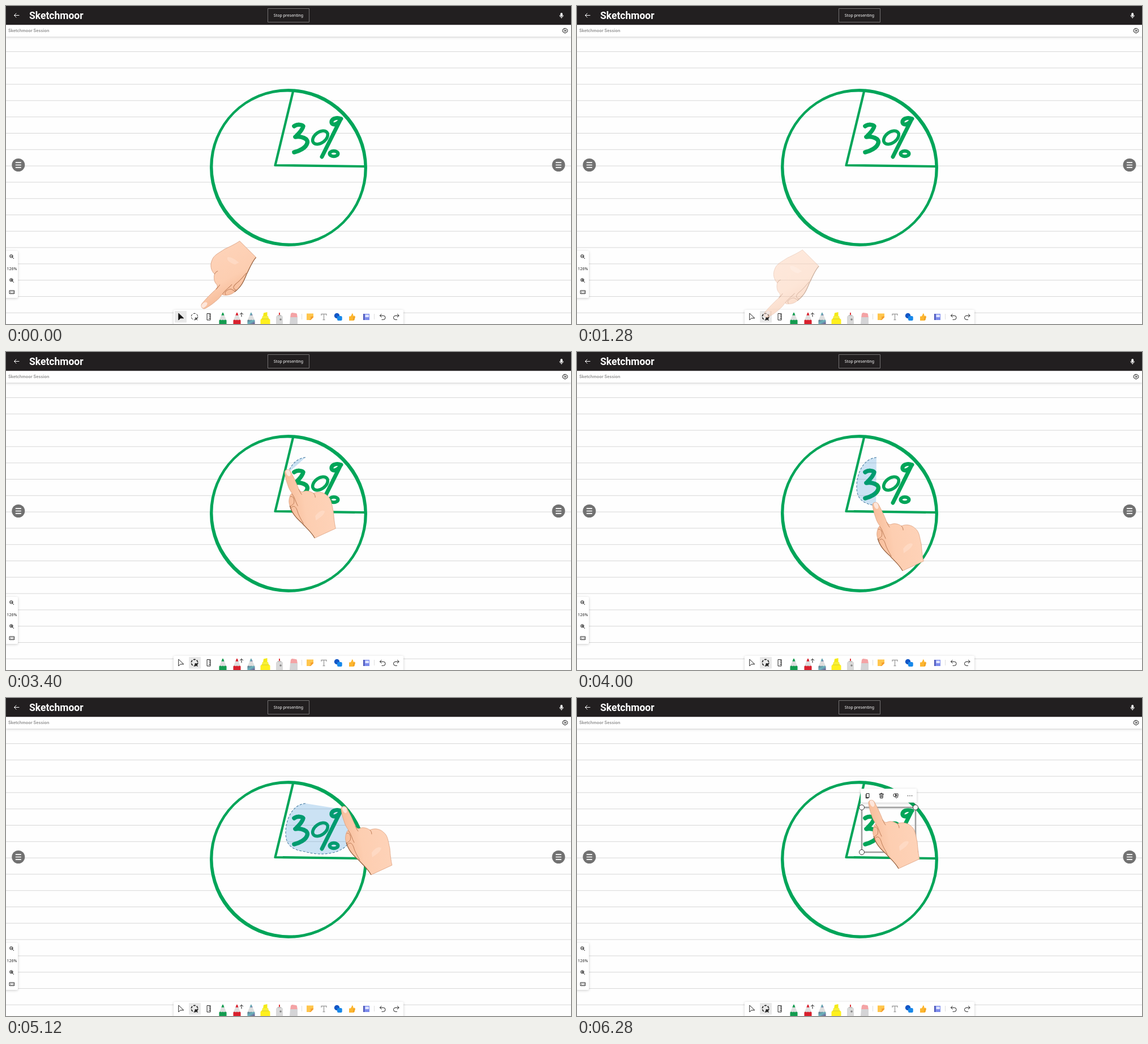
Animation, 998 px wide and 561 px high, one loop 6.96 s. Source, as an HTML page:

```html
<!DOCTYPE html>
<html lang="en">
<head>
<meta charset="utf-8">
<title>Lasso select</title>
<style>
  html, body { margin: 0; height: 100%; overflow: hidden; background: #fefefe; }
  svg { display: block; width: 998px; height: 561px; }
  .panel { fill: #fff; filter: drop-shadow(0 1px 2px #0003); }
  .icon { fill: none; stroke: #222; stroke-width: 1; stroke-linecap: round; stroke-linejoin: round; }
  .ink { fill: none; stroke: #00a559; stroke-linecap: round; stroke-linejoin: round; }
  .crease { fill: none; stroke: #b87550; stroke-width: .9; stroke-linecap: round; }
  text { font-family: "Noto Sans", sans-serif; font-size: 7px; }
</style>
</head>
<body>
<svg viewBox="0 0 998 561">
  <defs>
    <linearGradient id="skin" x1="0" y1=".6" x2="1" y2=".4">
      <stop offset="0" stop-color="#f5b995"/>
      <stop offset=".4" stop-color="#fdceb1"/>
      <stop offset="1" stop-color="#fed3b9"/>
    </linearGradient>
    <linearGradient id="galaxy" x2="1" y2="1">
      <stop offset="0" stop-color="#5e6f86"/>
      <stop offset=".5" stop-color="#69b5bd"/>
      <stop offset="1" stop-color="#6d4f8c"/>
    </linearGradient>
    <g id="menuButton">
      <circle r="11.5" fill="#717171"/>
      <path d="M-5-4.3H5M-5 0H5M-5 4.3H5" stroke="#fff" stroke-width="1.7"/>
    </g>
    <g id="lens" class="icon">
      <circle cx="-.7" cy="-.7" r="2.7"/><path d="M1.3 1.3 3.6 3.6M-2-.7H.6"/>
    </g>
    <g id="pen">
      <path d="M-6.5 13V6L-2.2-3H2.2L6.5 6V13Z" fill="#dedede"/>
      <path d="M-6.5 13V6.5Q-4 4.5-2 6.5 0 4.5 2 6.5 4 4.5 6.5 6.5V13Z"/>
      <path d="M-2.6-2.2-.9-6.6Q0-8 .9-6.6L2.6-2.2Z"/>
    </g>
  </defs>

  <path id="rules" stroke="#d7d7d7"/>

  <!-- drawing -->
  <path fill="#00a559" fill-rule="evenodd"
    d="M360 285a139 139 0 1 1 278 0a139 139 0 1 1-278 0ZM405.3 378.7A132.5 134.6-45 1 1 592.7 191.3A132.5 134.6-45 1 1 405.3 378.7Z"/>
  <g class="ink">
    <path d="M507 151 475.500 281 633 283" stroke-width="4.200"/>
    <path d="M509 212C514 208 523 209 525 212C524 219 516 226 511 231C521 229 535 234 532 242C530 250 518 256 509 258" stroke-width="7.500"/>
    <ellipse cx="555" cy="232" rx="15" ry="9.500" transform="rotate(-36 555 232)" stroke-width="5.500"/>
    <path d="M592 199C582 195 574 200 575 206C577 212 587 208 591 200L558 266" stroke-width="7"/>
    <ellipse cx="579" cy="260.500" rx="7.500" ry="4.700" stroke-width="6"/>
  </g>

  <!-- header -->
  <path class="panel" d="M0 30H998V54H0Z"/>
  <path fill="#221f20" d="M0 0H998V33.300H0Z"/>
  <path class="icon" style="stroke:#fff" d="M23 16.500H14.500M18 13 14.500 16.500 18 20"/>
  <text x="41" y="23" fill="#fff" style="font:700 17.500px Roboto,sans-serif">Sketchmoor</text>
  <path d="M462.500 4.500H535.500V28.500H462.500Z" fill="none" stroke="#757373"/>
  <text x="499" y="19" text-anchor="middle" fill="#fff" font-weight="500">Stop presenting</text>
  <rect x="979.300" y="12" width="3.800" height="6.500" rx="1.900" fill="#fff"/>
  <path class="icon" style="stroke:#fff" d="M978 16.500a3.200 3.200 0 0 0 6.400 0M981.200 20V21.500"/>
  <text x="4" y="46.300" fill="#8c8c8c" style="font:600 7.300px Inter,sans-serif">Sketchmoor Session</text>
  <g class="icon" transform="translate(987.500 43.500)">
    <path d="M-1.500-4H1.500L2-2.900 3.600-2.500 4.500 0 3.600 2.500 2 2.900 1.500 4H-1.500L-2 2.900-3.600 2.500-4.500 0-3.600-2.500-2-2.900Z"/>
    <circle r="1.500"/>
  </g>

  <!-- side controls -->
  <use href="#menuButton" x="21.800" y="280.500"/>
  <use href="#menuButton" x="976" y="280.500"/>
  <rect class="panel" x="-3" y="432" width="24" height="83" rx="2"/>
  <use href="#lens" x="10" y="442"/>
  <text x="1.500" y="466" fill="#222">126%</text>
  <use href="#lens" x="10" y="484"/>
  <path class="icon" d="M9.600 482V484.600M6.500 502H14.500V507.500H6.500ZM9 504 8 504.800 9 505.600M12 504 13 504.800 12 505.600"/>

  <!-- toolbar -->
  <rect class="panel" x="296" y="536" width="406" height="28" rx="2"/>
  <rect id="activeTool" y="538" width="21" height="20.500" rx="1" fill="#e9e9e9"/>
  <path id="pointer" class="icon" d="M304.800 542.500V554L308 550.800H313.500Z"/>
  <g id="lasso" class="icon">
    <circle cx="333" cy="548" r="5.700" stroke-dasharray="4 2" stroke-linecap="butt"/>
    <path d="M334.500 550.500 338 554"/><circle cx="335.500" cy="551.300" r="1.500"/>
  </g>
  <path class="icon" stroke-width="1.300" d="M355.500 542.500H361V554H355.500ZM358.500 545H361M359 548.200H361M358.500 551.300H361"/>
  <use href="#pen" x="383" y="548" fill="#129c4f"/>
  <use href="#pen" x="408" y="548" fill="#d9202d"/>
  <path class="icon" d="M416 548V541.500M413.300 544 416 541.300 418.700 544"/>
  <use href="#pen" x="433" y="548" fill="url(#galaxy)"/>
  <g transform="translate(458 548)">
    <path d="M-4 0-3-6.500 3.500-8V0Z" fill="#f4ea18"/>
    <path d="M-5-1H5L6.500 5H-6.500Z" fill="#f7f03a"/>
    <path d="M-8.500 13V6Q-8 3.500-5 3.500H5Q8.500 3.500 8.500 6V13Z" fill="#fff01d"/>
    <path d="M-6.500 4H6.500" stroke="#d6cf2a"/>
  </g>
  <g transform="translate(483 548)">
    <path d="M0-7V0" stroke="#e0383c" stroke-width="2"/>
    <path d="M-6 13V0L-3-3H3L6 0V13Z" fill="#d9d9d9"/>
    <circle cx="2" cy="5" r="1.800" fill="#888"/><path d="M-3-2H3" stroke="#aaa"/>
  </g>
  <g transform="translate(508 548)">
    <path d="M-6 2-5-5Q-4-7-2-7L4-6Q6-6 6-4L7 2Z" fill="#f4a3a5"/>
    <path d="M-7 13-6 1H7V13Z" fill="#d4d4d6"/>
  </g>
  <path d="M522.500 543V553M650.500 543V553" stroke="#ddd"/>
  <path d="M531 542.500H543V549L538 554H531Z" fill="#ffc64d"/>
  <path d="M543 547.500V549L538 554H534.500Q540 553 538 548Z" fill="#f59c2c"/>
  <path d="M557 546V543.500H566V546M561.500 543.500V553.500M559.500 553.500H563.500" fill="none" stroke="#a3a3a3" stroke-width="1.400"/>
  <circle cx="584.500" cy="546.500" r="4.700" fill="#1457c6"/>
  <rect x="585" y="547" width="8.700" height="8" rx="2" fill="#1688ea"/>
  <path d="M606 547.500H608.500Q611 545 611 542.500Q613.500 541.800 613.300 546.500H615.500Q617.500 547 616.800 549L615.500 553.500Q615 555 612.500 555H606Z" fill="#fdb62f"/>
  <path d="M613 549.300H616.500M613 551.500H616M613 553.500H615.500" stroke="#d98312" stroke-width=".7"/>
  <path d="M631 543H642V554H631Z" fill="#7d8cec"/>
  <path d="M634.500 544.500H641V549H634.500Z" fill="#dfe4ff"/>
  <path d="M631 543H633.300V554H631Z" fill="#4a55b8"/>
  <path class="icon" stroke-width="1.200" d="M663 543.500 660.500 546.300 663.300 549M660.500 546.300H666.500A3.500 3.500 0 0 1 666.500 553.300H664M691.500 543.500 694 546.300 691.200 549M694 546.300H688A3.500 3.500 0 0 0 688 553.300H690.500"/>

  <!-- lasso trail and selection -->
  <path id="area" fill="#0072cc" fill-opacity=".2"/>
  <path id="trail" fill="none" stroke="#4f82a6" stroke-width="1.100" stroke-dasharray="4 2.600"/>
  <g id="selection">
    <path d="M503 193H598V272H503Z" fill="none" stroke="#c8c8c8" stroke-width="3"/>
    <path d="M503 193H598V272H503Z" fill="none" stroke="#777"/>
    <g fill="#fff" stroke="#333">
      <circle cx="503" cy="193" r="4.500"/><circle cx="598" cy="193" r="4.500"/>
      <circle cx="503" cy="272" r="4.500"/><circle cx="598" cy="272" r="4.500"/>
    </g>
    <rect class="panel" x="501" y="160" width="99" height="24.500" rx="1.500"/>
    <g class="icon">
      <path d="M511.500 168.500H516V175.500H511.500ZM510.300 170V176.700H514.500"/>
      <path d="M534 169.500H541.500M536.500 169.300V168H539V169.300M535 169.500 535.500 176.500H540L540.500 169.500M537 171.500V174.500M538.700 171.500V174.500"/>
      <circle cx="561.500" cy="171.500" r="2.700"/>
      <path d="M563 169H567V173H563ZM561.500 174.200 564 176.500 567 174.500"/>
      <path stroke-width="1.500" d="M584.500 172.500h0M588 172.500h0M591.500 172.500h0"/>
    </g>
  </g>

  <!-- hand, with the fingertip at the local zero point -->
  <g id="hand">
    <path fill="url(#skin)" stroke="#d89a78" stroke-width=".7"
      d="M-5 4C-6-2 2-4 5 1C10 10 16 22 20 33C22 37 25 38 28 37C34 34 42 37 46 40C54 36 64 38 70 44C78 50 78 60 81 72C82 84 83 94 85 102L48 119C42 108 33 101 26 93C16 84 8 76 5 64C2 58 2 52 4 46C5 43 6 41 8 40C5 36 2 31 0 24C-3 16-4 10-5 4Z"/>
    <path fill="#fde6db" d="M-3 2C-4-2 2-3 4 1C6 5 6 9 3 10C0 10-2 6-3 2Z"/>
    <path fill="#ffe0cd" opacity=".6" d="M49 80C55 72 62 68 66 72C64 80 55 84 50 88Z"/>
    <path class="crease" d="M8 41C13 47 14 55 18 62M5 46C10 43 13 52 11 58C9 61 6 61 5 64M6 66C10 61 14 62 17 70C19 78 24 86 28 93M20 33C22 37 23 40 25 42M46 40C48 42 49 44 49 47"/>
    <path fill="none" stroke="#95613f" stroke-width="1.200" d="M4 62C8 76 16 84 26 93C33 101 42 108 48 119"/>
  </g>
</svg>
<script>
const LOOP = 6960;
const $ = id => document.getElementById(id);
const show = (id, on) => $(id).style.display = on ? '' : 'none';
const ramp = (t, from, to) => Math.min(1, Math.max(0, (t - from) / (to - from)));
const ease = u => u * u * (3 - 2 * u);
const mix = (a, b, u) => a.map((v, i) => v + (b[i] - v) * u);

// Lasso stroke: each leg has an end time, two control points and an end point.
const START = [529, 186], START_TIME = 3040;
const legs = [
  [3600, [505, 188], [494, 215], [494, 238]],
  [4000, [494, 262], [508, 268], [528, 271]],
  [4600, [550, 278], [590, 278], [605, 256]],
  [5120, [606, 240], [606, 214], [598, 197]],
  [5640, [584, 186], [562, 182], [544, 182]],
  [5800, [538, 182], [533, 184], [528, 185]]
];

function bezier(a, b, c, d, u) {
  const bc = mix(b, c, u);
  return mix(mix(mix(a, b, u), bc, u), mix(bc, mix(c, d, u), u), u);
}

function strokeUntil(t) {
  const points = [START];
  let from = START, begin = START_TIME;
  for (const [end, c1, c2, to] of legs) {
    const u = ramp(t, begin, end);
    if (!u) break;
    for (let i = 1; i <= 16; i++) points.push(bezier(from, c1, c2, to, u * i / 16));
    from = to;
    begin = end;
  }
  return points;
}

function draw(t) {
  const picked = t >= 520, done = t >= 5840, second = t >= 2000;
  $('activeTool').setAttribute('x', picked ? 323 : 298);
  $('pointer').style.fill = picked ? 'none' : '#111';
  $('lasso').style.strokeWidth = picked ? 1.7 : 1;

  const points = strokeUntil(t);
  const path = 'M' + points.join('L');
  $('area').setAttribute('d', path + 'Z');
  $('trail').setAttribute('d', path);
  show('area', !done);
  show('trail', !done);
  show('selection', done);

  let tip = mix([347, 530], [332.5, 545.5], ease(ramp(t, 40, 600)));
  if (second) {
    const [x, y] = points[points.length - 1];
    tip = mix([x - 1, y - 4], [520, 182], ease(ramp(t, 5840, 6080)));
  }
  $('hand').setAttribute('transform', `translate(${tip}) rotate(${second ? 0 : -110.5})`);
  $('hand').setAttribute('opacity', second ? ramp(t, 2880, 3040) : 1 - ramp(t, 1080, 1480));
}

$('rules').setAttribute('d', Array.from({ length: 17 }, (_, i) => `M0 ${80.5 + 28.8 * i}H998`).join(''));

const began = performance.now();
function tick() {
  draw((performance.now() - began) % LOOP);
  requestAnimationFrame(tick);
}
tick();
</script>
</body>
</html>
```
